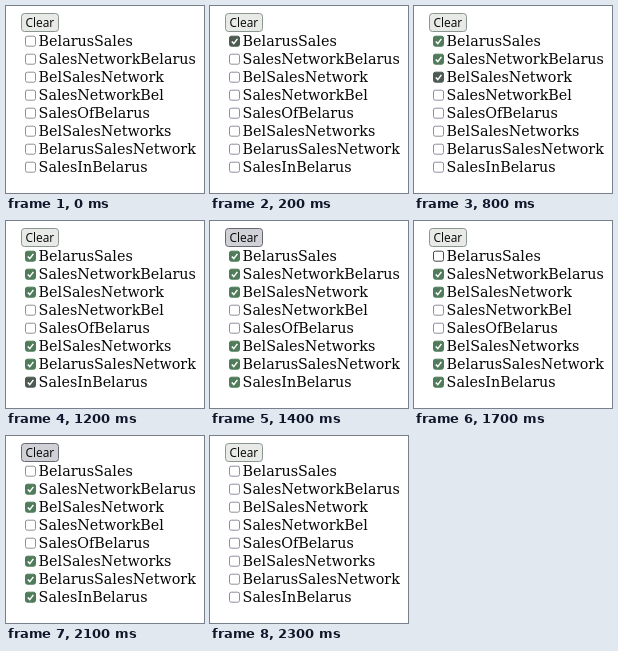
An HTML page with a canvas for the animation above (2400 ms loop, 198x187 px).

```html
<!DOCTYPE html>
<html lang="en">
<head>
<meta charset="utf-8">
<title>Checkbox list</title>
<style>
  html, body { margin: 0; width: 100%; height: 100%; overflow: hidden; background: #fff; }
  canvas { display: block; width: 198px; height: 187px; }
</style>
</head>
<body>
<canvas id="stage"></canvas>
<script>
const W = 198, H = 187, LOOP = 2400, STEP = 100;
const canvas = document.getElementById('stage');
const ctx = canvas.getContext('2d');
const dpr = window.devicePixelRatio || 1;
canvas.width = Math.round(W * dpr);
canvas.height = Math.round(H * dpr);
ctx.scale(dpr, dpr);

const labels = ['BelarusSales', 'SalesNetworkBelarus', 'BelSalesNetwork', 'SalesNetworkBel',
  'SalesOfBelarus', 'BelSalesNetworks', 'BelarusSalesNetwork', 'SalesInBelarus'];
const BUTTON = 'button', NONE = -1;

// [time, row toggled]; the button clears every row
const clicks = [[200, 0], [500, 1], [700, 2], [1000, 5], [1100, 6], [1200, 7], [1600, 0], [2200, BUTTON]];
// [time, item under the pointer from then on]
const hovers = [[0, NONE], [100, 0], [400, 1], [700, 2], [900, 5], [1100, 6], [1200, 7],
  [1300, BUTTON], [1500, 0], [2000, BUTTON], [2300, NONE]];

// One em size for all labels, whichever serif is installed
const serif = '"DejaVu Serif", "Noto Serif", serif';
ctx.font = `100px ${serif}`;
const labelSize = 157.4 / ctx.measureText(labels[6]).width * 100;
const labelFont = `${labelSize.toFixed(1)}px ${serif}`;
const buttonFont = '11.9px "Open Sans", "Noto Sans", sans-serif';

function stateAt(t) {
  const checked = labels.map(() => false);
  for (const [time, item] of clicks) {
    if (time > t) break;
    if (item === BUTTON) checked.fill(false);
    else checked[item] = !checked[item];
  }
  let hover = NONE;
  for (const [time, item] of hovers) if (time <= t) hover = item;
  return { checked, hover };
}

function box(x, y, w, h, r, fill, stroke) {
  ctx.beginPath();
  ctx.roundRect(x, y, w, h, r);
  ctx.fillStyle = fill;
  ctx.fill();
  ctx.strokeStyle = stroke;
  ctx.lineWidth = 1;
  ctx.stroke();
}

function text(str, x, y, font) {
  ctx.font = font;
  ctx.fillStyle = '#060606';
  ctx.fillText(str, x, y);
}

function drawButton(hover) {
  box(15.5, 7.5, 37, 18, 3, hover ? '#d0d0d7' : '#e7eae6', hover ? '#676774' : '#8b968f');
  text('Clear', 19.5, 20.9, buttonFont);
}

function drawRow(i, checked, hover) {
  const y = 30.2 + i * 18;
  if (checked) {
    const green = hover ? '#4d5b53' : '#507c5b';
    box(19.5, y, 10, 10, 1.8, green, green);
    ctx.beginPath();
    ctx.moveTo(21.8, y + 5.2);
    ctx.lineTo(23.8, y + 7.4);
    ctx.lineTo(27.4, y + 2.7);
    ctx.strokeStyle = '#fff';
    ctx.lineWidth = 1.5;
    ctx.stroke();
  } else {
    box(19.5, y, 10, 10, 1.8, '#fff', hover ? '#45454f' : '#8f8f9d');
  }
  text(labels[i], 32.6, 40 + i * 18, labelFont);
}

function frame(now) {
  const t = Math.floor((now % LOOP) / STEP) * STEP;
  const { checked, hover } = stateAt(t);
  ctx.fillStyle = '#fff';
  ctx.fillRect(0, 0, W, H);
  drawButton(hover === BUTTON);
  labels.forEach((_, i) => drawRow(i, checked[i], hover === i));
}

const start = performance.now();
function tick() {
  frame(performance.now() - start);
  requestAnimationFrame(tick);
}
tick();
</script>
</body>
</html>
```
